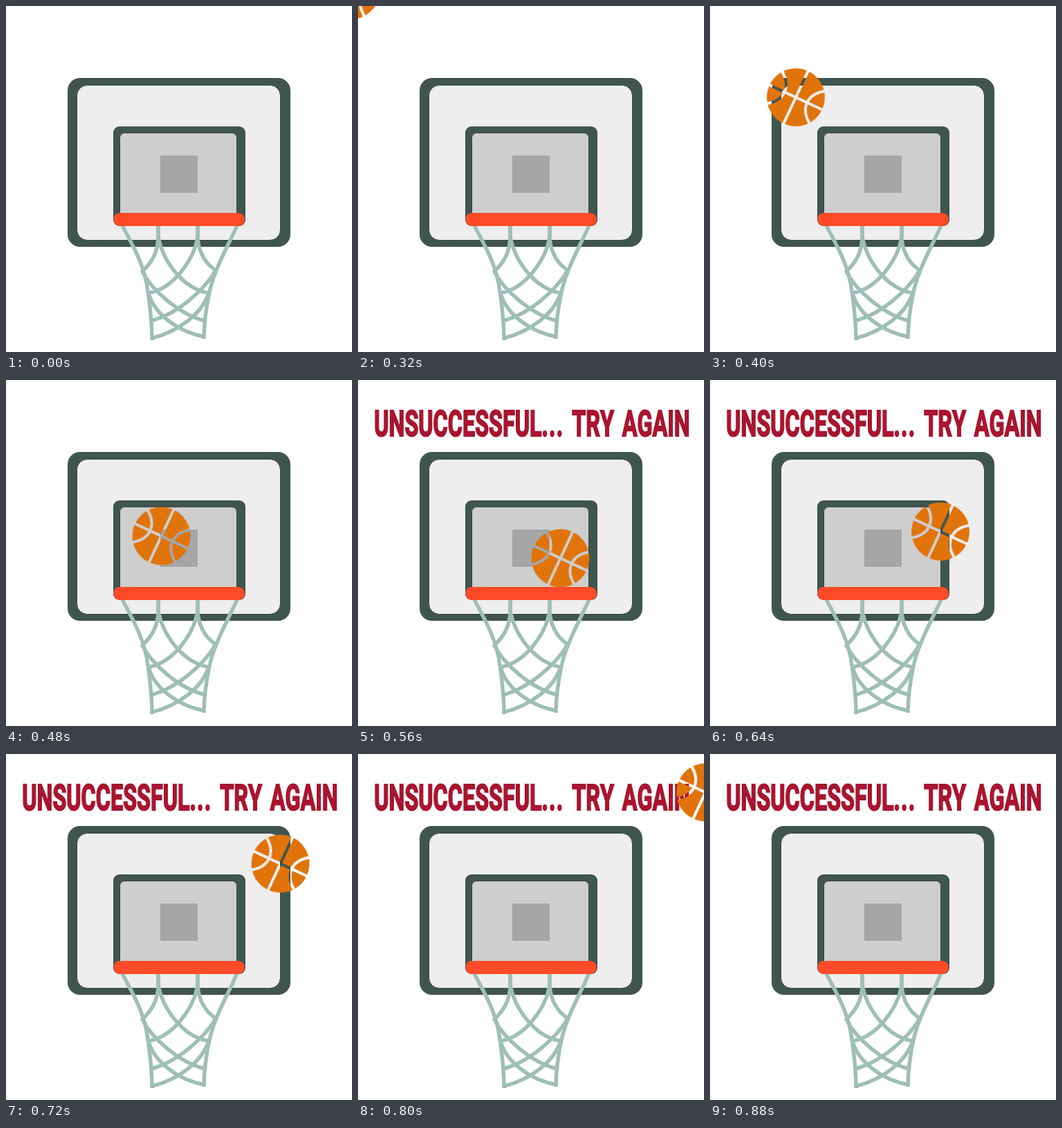
Write an HTML page that moves like this. It is 500 px wide and 500 px high and loops after 960 ms.

```html
<!DOCTYPE html>
<html lang="en">
<head>
<meta charset="utf-8">
<title>Unsuccessful... try again</title>
<style>
html, body { margin: 0; width: 100%; height: 100%; overflow: hidden; background: #fff; }
svg { display: block; width: 100%; height: 100%; }
.net { fill: none; stroke: #9fbeb7; stroke-width: 5.4; }
.seams { fill: none; stroke: #000; stroke-width: 4; }
.msg {
  font: bold 51.5px Roboto, "Liberation Sans", sans-serif;
  font-kerning: none;
  word-spacing: 6px;
  fill: #a9152f; stroke: #a9152f; stroke-width: 2;
  animation: show .96s step-end infinite;
}
.dots { letter-spacing: 2px; }
.ball { animation: toss .96s step-end infinite; }
@keyframes show {
  0% { opacity: 0; }
  58.33%, 100% { opacity: 1; }
}
/* slows towards the rim, then speeds away to the upper right */
@keyframes toss {
  0% { transform: translate(-100px, -100px); }
  33.33% { transform: translate(-10.5px, -22.5px); }
  41.66% { transform: translate(124px, 132px); }
  50% { transform: translate(224.5px, 225.5px); }
  58.33% { transform: translate(292.5px, 257.5px); }
  66.66% { transform: translate(333px, 219px); }
  75% { transform: translate(396.5px, 158.5px); }
  83.33% { transform: translate(502px, 55.5px); }
  91.66%, 100% { transform: translate(600px, -100px); }
}
</style>
</head>
<body>
<svg viewBox="0 0 500 500">
  <defs>
    <mask id="gaps" maskUnits="userSpaceOnUse" x="-44" y="-44" width="88" height="88">
      <rect x="-44" y="-44" width="88" height="88" fill="#fff"/>
      <path class="seams" d="M-44 0H44M0 -44V44M-36 -27C-12 -12 -12 12 -36 27M36 -27C12 -12 12 12 36 27"/>
    </mask>
  </defs>

  <!-- backboard -->
  <rect x="89" y="104" width="322" height="244" rx="18" fill="#40554f"/>
  <rect x="102.5" y="114.5" width="294" height="224" rx="15" fill="#eee" stroke="#33443f"/>
  <rect x="155" y="174" width="191" height="144" rx="9" fill="#40554f"/>
  <rect x="164.5" y="183.5" width="169" height="130" rx="7" fill="#cecece" stroke="#33443f"/>
  <rect x="223" y="216" width="54" height="54" fill="#a6a6a6"/>

  <g class="net">
    <path d="M168 317C182 345 200 372 205 412C209 440 211 460 211 483"/>
    <path d="M334 317C322 345 304 374 295 409C288 440 286 460 286 481"/>
    <path d="M220 317V336C219 356 211 371 197 383"/>
    <path d="M220 317V332C224 364 254 409 294 415"/>
    <path d="M277 317V336C279 356 288 372 303 382"/>
    <path d="M277 317V332C273 364 243 409 205 415"/>
    <path d="M196 382C210 410 250 446 288 455"/>
    <path d="M303 382C287 410 247 446 209 455"/>
    <path d="M206 415C214 444 246 470 287 478"/>
    <path d="M293 415C283 444 251 470 211 480"/>
  </g>
  <rect x="155" y="299" width="190" height="19" rx="9.5" fill="#ff4b28"/>

  <text class="msg" transform="translate(23.3 80.7) scale(.628 1)">UNSUCCESSFUL<tspan class="dots">...</tspan> TRY AGAIN</text>

  <g class="ball">
    <g transform="rotate(25)">
      <circle r="42" fill="#e1730b" mask="url(#gaps)"/>
    </g>
  </g>
</svg>
</body>
</html>
```
